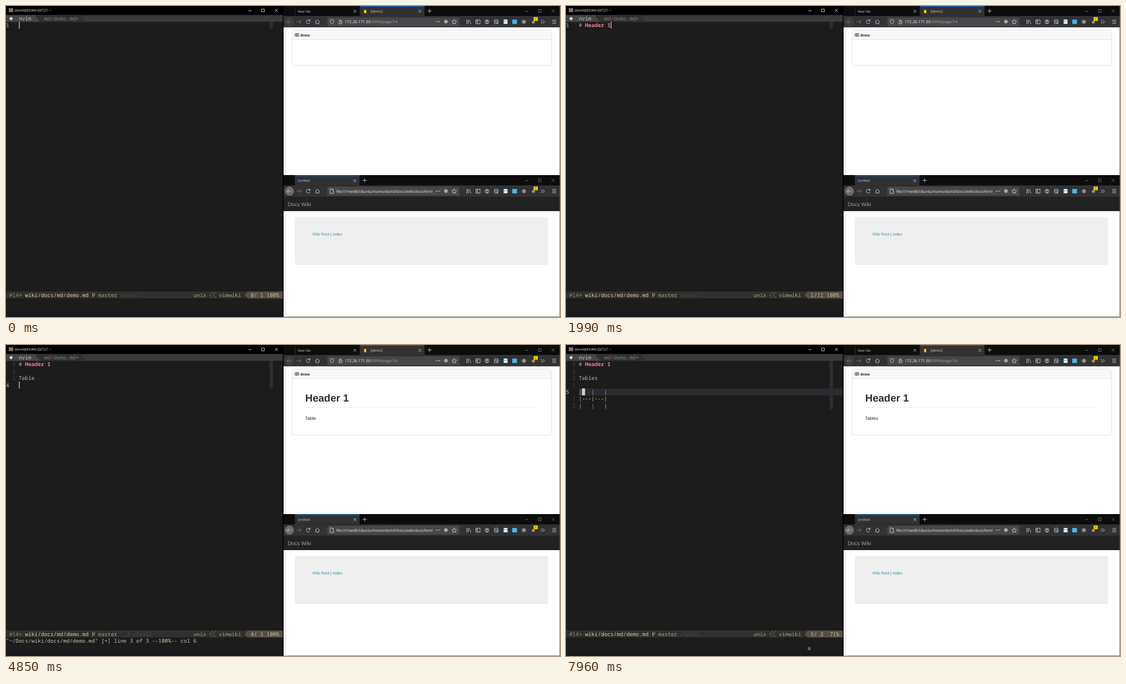
Write an HTML page that moves like this. It is 998x561 px and loops after 8000 ms.

```html
<!DOCTYPE html>
<html lang="en">
<head>
<meta charset="utf-8">
<title>Wiki editing demo</title>
<style>
  html, body { margin: 0; width: 100%; height: 100%; overflow: hidden; background: #000; }
  svg { display: block; }
  text { white-space: pre; text-rendering: geometricPrecision; }
  .mono { font: 9.54px "Noto Sans Mono", "DejaVu Sans Mono", monospace; }
  .ui { font-family: "Open Sans", "Noto Sans", sans-serif; }
  .page { font-family: "Liberation Sans", Arial, sans-serif; }
  .line { fill: none; stroke: #d0d0d2; stroke-width: .9; }
  .dim { stroke: #747476; }
  .bold { font-weight: 700; }
</style>
</head>
<body>
<svg width="998" height="561" viewBox="0 0 998 561">
  <defs>
    <linearGradient id="shade">
      <stop stop-color="#e6e6e6"/><stop offset="1" stop-color="#fff"/>
    </linearGradient>
    <path id="close" class="line" d="M-2.3-2.3 2.3 2.3M2.3-2.3-2.3 2.3"/>
    <path id="plus" class="line" d="M-3.5 0H3.5M0-3.5V3.5"/>
    <g id="controls">
      <path class="line dim" d="M935 9.5H940M959 6.5H964V11.5H959ZM983 6.5 988 11.5M988 6.5 983 11.5"/>
    </g>
    <!-- toolbar shared by both browser windows, y is relative to the window top -->
    <g id="toolbar">
      <rect x="500" y="0" width="498" height="18" fill="#0c0c0d"/>
      <rect x="500" y="18" width="498" height="21" fill="#323234"/>
      <use href="#controls"/>
      <path class="line dim" d="M523.5 28.500H531.5M528 25 531.500 28.500 528 32"/>
      <path class="line" d="M547.200 26.500A3.400 3.400 0 1 0 547.600 29.500M547.800 24V27H544.800M557 28.500 561 24.800 565 28.500M558.300 28V32H563.700V28"/>
      <rect x="579" y="20.500" width="238" height="16" rx="1.500" fill="#474749"/>
      <g fill="#d0d0d2">
        <circle cx="775" cy="28.300" r=".9"/><circle cx="778" cy="28.300" r=".9"/><circle cx="781" cy="28.300" r=".9"/>
        <circle cx="792.500" cy="28.300" r="3.300" opacity=".7"/>
      </g>
      <path class="line" d="M807.500 24.200 808.800 27.100 811.900 27.400 809.500 29.500 810.200 32.500 807.500 30.900 804.800 32.500 805.500 29.500 803.100 27.400 806.200 27.100Z"/>
      <path class="line" d="M830 24.500V32.500M832.500 24.500V32.500M834.500 25 837.500 32.500M846.500 25H854V32H846.500ZM849.500 25V32M847 28H849"/>
      <circle class="line" cx="866.500" cy="28.500" r="3.600"/>
      <circle cx="866.500" cy="27.500" r="1.500" fill="#d0d0d2"/>
      <path d="M864 30.500H869L866.500 32Z" fill="#d0d0d2"/>
      <rect class="line" x="880" y="25" width="6.500" height="7" rx="1"/>
      <path class="line" d="M880 28H886.500M883 30.500H886"/>
      <rect x="896" y="24.500" width="8" height="8" fill="#4aa9e0"/>
      <path d="M897.500 24.500H902.500V27.500H897.500ZM897 28.500H903V32H897Z" fill="#eef6fb"/>
      <rect x="912" y="24.500" width="8.500" height="8" fill="#48b5e8"/>
      <circle cx="933" cy="28.500" r="3.600" fill="#988c86"/>
      <circle cx="950" cy="29" r="2.800" fill="#b98a3c"/>
      <rect x="950.500" y="20" width="7.500" height="6.800" rx="1" fill="#f5d400"/>
      <text class="ui" x="952.800" y="25.700" font-size="6" fill="#222">1</text>
      <path class="line" d="M963.500 25.500 966.500 28.500 963.500 31.500M967 25.500 970 28.500 967 31.500M984 25.500H991M984 28.500H991M984 31.500H991"/>
    </g>
    <path id="back" class="line" d="M514 28.500H506.500M510 25 506.500 28.500 510 32"/>
  </defs>

  <!-- terminal -->
  <rect y="16" width="498.500" height="537" fill="#1c1c1c"/>
  <rect y="552.500" width="498.500" height="8.500" fill="#161a1d"/>
  <rect x="5" y="4" width="8" height="7" fill="#77706a"/>
  <text class="ui" x="15.500" y="10.300" font-size="6.200" fill="#f0f0f0">domil@DOMI-QVT27: ~</text>
  <path class="line" d="M437 8.500H442.500M460.500 5.500H465.500V10.500H460.500ZM484.500 5.500 489.500 10.500M489.500 5.500 484.500 10.500"/>
  <rect y="16.500" width="498.500" height="12" fill="#393939"/>
  <path d="M52 16.500H134L144 28.500H52Z" fill="#303030"/>
  <path d="M0 16.500H52L61 28.500H0Z" fill="#454545"/>
  <path d="M9.200 19.200 12.700 22.700 9.200 26.200 5.700 22.700Z" fill="#d0d0d0"/>
  <g class="mono">
    <text x="22.900" y="25.900" fill="#c0c0b8">nvim</text>
    <text x="68.700" y="25.900" fill="#7c7c78">md/demo.md+</text>
  </g>
  <rect y="515" width="498.500" height="12.500" fill="#302f2c"/>
  <path d="M429.500 521.200 436 515H498.500V527.500H436Z" fill="#554f46"/>
  <path fill="none" stroke="#7d7668" d="M372.500 515.500 367 521.200 372.500 527M378.500 515.500 373 521.200 378.500 527"/>
  <path fill="none" stroke="#cbbd9c" d="M156.500 517V525.500M160 518.500V520.500L156.500 523"/>
  <g id="term" class="mono"></g>

  <!-- upper browser -->
  <use href="#toolbar"/>
  <rect x="500" y="38.500" width="498" height="266.500" fill="#fff"/>
  <rect x="638" width="116" height="18" fill="#323234"/>
  <rect x="638" width="116" height="1" fill="#0a78e0"/>
  <path d="M520.500 2V17M637.500 2V17" stroke="#2b2b2d"/>
  <rect x="645" y="7" width="4" height="6" fill="#f5c400"/>
  <g class="ui" font-size="5.900" fill="#c8c8ca">
    <text x="525.500" y="11.800">New Tab</text>
    <text x="656.500" y="11.800" font-size="6.600">[demo]</text>
  </g>
  <use href="#close" x="628.500" y="9.500"/>
  <use href="#close" x="745.500" y="9.500"/>
  <use href="#plus" x="763" y="9"/>
  <circle cx="510.500" cy="28.500" r="7.500" fill="#3d3d3f" stroke="#4a4a4c"/>
  <use href="#back" opacity=".4"/>
  <path class="line" d="M587 24.500 590 25.500V28.500Q590 31 587 32.500Q584 31 584 28.500V25.500Z"/>
  <path class="line" d="M600 28H605V32H600ZM601 28V25.500H604V28"/>
  <path d="M598.500 24.500 606 32.500" stroke="#e0566a" stroke-width=".9"/>
  <text class="ui" x="610" y="31.200" font-size="7.200" fill="#f4f4f6">172.26.171.50<tspan fill="#a2a2a6">:9999/page/14</tspan></text>
  <rect x="500" y="39" width="7" height="266" fill="url(#shade)"/>
  <g id="page" class="page"></g>

  <!-- lower browser -->
  <g transform="translate(0 305.500)">
    <use href="#toolbar"/>
    <rect x="520.500" width="116.500" height="18" fill="#323234"/>
    <rect x="520.500" y=".3" width="116.500" height="1" fill="#0a78e0"/>
    <text class="ui" x="525.500" y="11.800" font-size="5.900" fill="#c8c8ca">Untitled</text>
    <use href="#close" x="628.500" y="9.500"/>
    <use href="#plus" x="646" y="9"/>
    <circle cx="510.500" cy="28.500" r="7.500" fill="#68686a" stroke="#88888a"/>
    <use href="#back"/>
    <path class="line" d="M584 24.500H588L590 26.500V32.500H584ZM588 24.500V26.500H590"/>
    <text class="ui" x="595" y="31.200" font-size="6.800" fill="#f0f0f2">file://///wsl$/Ubuntu/home/domil/Docs/wiki/docs/html</text>
  </g>
  <rect x="500" y="344" width="498" height="26.500" fill="#222"/>
  <rect x="500" y="370" width="498" height="190.500" fill="#fff"/>
  <rect x="500" y="370.500" width="7" height="190" fill="url(#shade)"/>
  <rect x="520.500" y="380.500" width="456" height="86.500" rx="3" fill="#eee"/>
  <g class="page">
    <text x="507.500" y="360.600" font-size="9.500" fill="#a0a0a0">Docs Wiki</text>
    <text x="552" y="413.600" font-size="7.200" fill="#3492b4">Wiki Root | index</text>
  </g>
  <rect x="997.300" width=".7" height="561" fill="#555"/>
</svg>

<script>
const LOOP = 8000, CW = 5.725, RH = 12.475, TOP = 28.5;
const term = document.getElementById('term');
const page = document.getElementById('page');

const rowY = r => TOP + (r - 1) * RH;
const rect = (x, y, w, h, fill) => `<rect x="${x}" y="${y}" width="${w}" height="${h}" fill="${fill}"/>`;
const put = (s, col, row, fill, cls = '') =>
  `<text class="${cls}" x="${col * CW}" y="${rowY(row) + 9.6}" fill="${fill}">${s}</text>`;

const written = (line, col) => `"~/Docs/wiki/docs/md/demo.md" [+] line ${line} of ${line} --100%-- col ${col}`;
const H1 = '# Header 1';
const GRID = ['|   |   |', '|---|---|', '|   |   |'];

// [time, what changes]; each entry builds on the one before
const steps = [
  [0, { lines: [''], row: 1, col: 1, msg: '', key: '', pop: '', body: [], pct: 100 }]
];
const at = (time, change) => steps.push([time, change]);
const type = (time, lines, change) =>
  at(time, { lines, row: lines.length, col: lines[lines.length - 1].length + 1, msg: '', pop: '', ...change });

[690, 940, 1240, 1370, 1500].forEach((t, i) => type(t, [H1.slice(0, i + 1)]));
at(1540, { pop: 'hea', msg: 'The only match' });
[1570, 1680, 1780, 1880, 1990].forEach((t, i) => type(t, [H1.slice(0, i + 6)]));
at(2760, { normal: true, col: 10 });
at(2800, { msg: written(1, 10), body: ['Header 1'] });
at(2950, { key: 'o' });
type(3000, [H1, ''], { normal: false, key: '', msg: written(1, 10) });
type(3100, [H1, '', ''], { msg: written(1, 10) });
type(3480, [H1, '', 'T']);
type(3520, [H1, '', 'Ta']);
at(3560, { pop: 'ta', msg: 'match 1 of 30' });
[3640, 3710, 3790, 3870].forEach((t, i) => type(t, [H1, '', 'Table '.slice(0, i + 3)]));
type(4850, [H1, '', 'Table ', ''], { msg: written(3, 6), body: ['Header 1', 'Table'], trail: true });
const saved = { msg: written(3, 6) };
type(5550, [H1, '', 'Table '], saved);
type(5660, [H1, '', 'Table'], { ...saved, trail: false });
type(6000, [H1, '', 'Tables'], saved);
type(6150, [H1, '', 'Tables', ''], saved);
at(6200, { body: ['Header 1', 'Tables'] });
type(6350, [H1, '', 'Tables', '', ''], saved);
at(7830, { normal: true });
at(7870, { lines: [H1, '', 'Tables', '', ...GRID], msg: '', pct: 71 });
at(7920, { col: 2 });
at(7960, { key: 'a' });

let last = {};
const states = steps.map(([time, change]) => (last = { ...last, ...change, time }));

function drawLine(s, row) {
  if (s[0] === '#') return put('#', 4, row, '#d49a9a') + put(s.slice(2), 6, row, '#f0858f', 'bold');
  if (s[0] !== '|') return put(s, 4, row, '#bdb9ab');
  const rule = s[1] === '-';
  return [...s].map((c, i) => c === ' ' ? '' :
    put(c, 4 + i, row, i === 4 && !rule ? '#7d9bd6' : '#c9b672')).join('');
}

function headerMenu() {
  const base = '/home/domil/Docs/wiki/school/files/summer-2020/CISC-191/week-5/';
  const src = 'labs/javanotes8/source/';
  const info = [base, src + 'chapter6/Card.java', base, src + 'chapter12/netgame/fivecarddraw/PokerC',
    'ard.java', base, src + 'chapter5/Card.java'];
  return rect(28.6, rowY(2), 91.6, RH, '#b0b4b0') + put('HEARTS [T]', 6, 2, '#444') +
    rect(120.2, rowY(2), 378, 7 * RH, '#2f3439') +
    info.map((s, i) => put(s, s === base ? 22 : 25, i + 2, '#b2b2ae')).join('');
}

function wordMenu() {
  const words = ['Taskwarrior', 'TAN', 'TASK_COMMAND', 'ToolPaint', 'TextReader', 'ThreadTest3', 'ThreadTest1',
    'ThreadTest4', 'ThreadTest2', 'TestDialogs', 'TrivialEdit', 'TransformDemo', 'TestStopWatch',
    'TowersOfHanoi', 'TicTacToeWindow'];
  const y = rowY(4);
  return rect(17.2, y, 189, 15 * RH, '#2f3439') + rect(17.2, y, 189, RH, '#b0b0b0') +
    rect(206.2, y, 5.7, 15 * RH, '#747474') + rect(206.2, y, 5.7, 7 * RH, '#e8e8e8') +
    words.map((w, i) => {
      const fill = i ? '#b2b2ae' : '#484848';
      return put(w, 4, i + 4, fill) + put(i ? '[T]' : '[B]', 31, i + 4, fill);
    }).join('');
}

function drawStatus(s) {
  const empty = s.lines.length === 1 && !s.lines[0];
  const pos = `${empty ? 0 : s.row}/${String(s.col).padStart(2)} ${String(s.pct).padStart(3)}%`;
  return put('#14', 1, 40, '#8d8674') + put('+', 4, 40, '#b98d55') +
    put('wiki/docs/md/demo.md', 6, 40, '#dccba3') + put('master', 29, 40, '#a99d85') +
    put(s.trail ? ' _3 cSpell' : 'cSpell', 36, 40, '#4a4843') +
    put('unix', 59, 40, '#a99d85') + put('vimwiki', 67, 40, '#a99d85') + put(pos, 77, 40, '#c6b994');
}

function drawTerm(s) {
  const y = rowY(s.row), x = (s.col + 3) * CW;
  let out = rect(475, TOP, 6, s.lines.length * RH, '#2c2e31');
  if (s.normal) out += rect(22.9, y, 475.6, RH, '#292b2e');
  s.lines.forEach((line, i) => {
    const row = i + 1, gap = Math.abs(row - s.row);
    out += gap ? put(gap, 2, row, '#444642') : put(row, 0, row, '#c9b56e');
    out += drawLine(line, row);
  });
  if (s.trail) out += put('·', 9, 3, '#444642');
  if (s.normal) {
    const title = s.row === 1;
    out += rect(x, y, CW, RH, title ? '#d9799a' : '#cfcfcb');
    if (title) out += put('1', s.col + 3, 1, '#1c1c1c');
  } else out += rect(x + .5, y, 1.1, RH, '#e4e4e0');
  if (s.pop) out += s.pop === 'hea' ? headerMenu() : wordMenu();
  return out + drawStatus(s) + put(s.msg, 0, 41, s.pop === 'ta' ? '#b3ad68' : '#bdbdb5') + put(s.key, 76, 42, '#bdbdb5');
}

function drawPage([title, para]) {
  const bottom = para ? 162.5 : title ? 136.5 : 107.5;
  let out = `<rect x="515.5" y="43.5" width="467" height="${bottom - 43.5}" rx="2" fill="#fff" stroke="#e1e4e8"/>` +
    rect(516, 44, 466, 16, '#f6f8fa') + rect(516, 60, 466, 1, '#e1e4e8') +
    '<path d="M520.500 49.500H527.500V54.500H520.500ZM524 49.500V55.500M521.500 51.300H526.500M521.500 53H526.500" fill="none" stroke="#444" stroke-width=".8"/>' +
    '<text x="530" y="54.500" font-size="7.500" fill="#222" class="bold" style="font-family:\'Liberation Serif\',serif">demo</text>';
  if (title) out += `<text class="bold" x="539" y="101.600" font-size="18.600" fill="#2c2f33">${title}</text>` +
    rect(540, 112, 419, 1, '#eeeef0');
  if (para) out += `<text x="539" y="134.500" font-size="8.100" fill="#24292e">${para}</text>`;
  return out;
}

let shown = null;
function frame() {
  const t = performance.now() % LOOP;
  const s = states.findLast(e => e.time <= t);
  if (s !== shown) {
    term.innerHTML = drawTerm(s);
    page.innerHTML = drawPage(s.body);
    shown = s;
  }
  requestAnimationFrame(frame);
}
frame();
</script>
</body>
</html>
```
